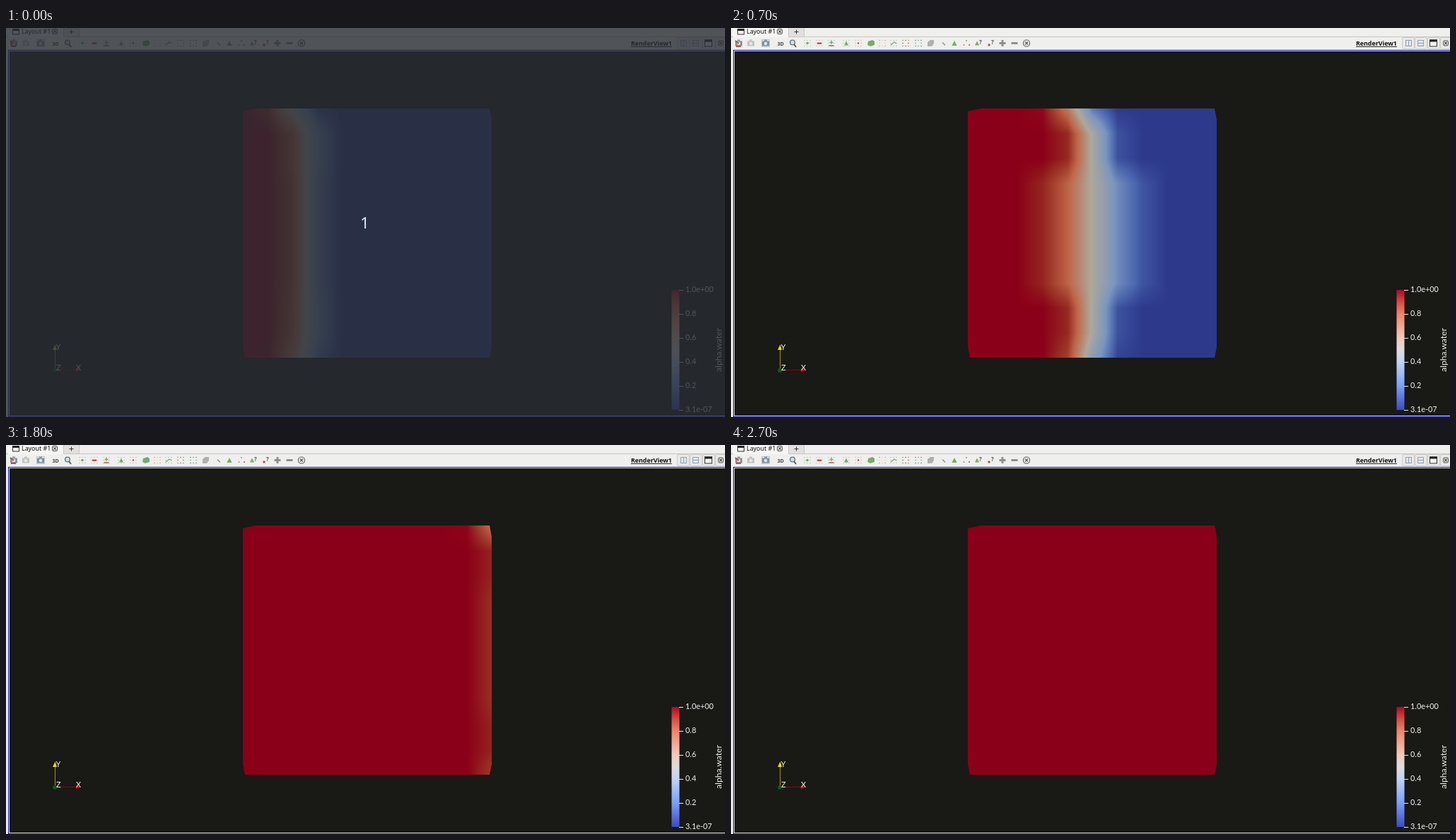
Animation, 1017 px wide and 551 px high, one loop 5.1 s. Source, as an HTML page with a canvas:

```html
<!DOCTYPE html>
<html lang="en">
<head>
<meta charset="utf-8">
<title>Render view</title>
<style>
  html, body { margin: 0; width: 100%; height: 100%; overflow: hidden; background: #191916; }
  svg, #veil { position: absolute; left: 0; top: 0; width: 1017px; height: 551px; display: block; }
  #field {
    position: absolute; left: 335px; top: 114px;
    clip-path: polygon(0 4px, 18px 0, 349px 0, 352px 16px, 352px 338px, 349px 353px, 3px 353px, 0 338px);
  }
  .ui { font: 8.85px "Noto Sans", "Open Sans", sans-serif; fill: #111; }
  .bold { font-weight: 700; }
  .label { font: 10.9px Lato, sans-serif; fill: #f2f2f2; }
  #veil {
    background: rgba(40, 44, 52, .8); color: #d3effb;
    font: 22px/551px "Noto Sans", "Open Sans", sans-serif; text-align: center;
  }
  #veil span { position: relative; left: -1px; }
</style>
</head>
<body>
<svg id="ui" viewBox="0 0 1017 551">
  <defs>
    <linearGradient id="scale" x1="0" y1="0" x2="0" y2="1">
      <stop offset="0" stop-color="#b40426"/>
      <stop offset=".1" stop-color="#d44e41"/>
      <stop offset=".2" stop-color="#ee8468"/>
      <stop offset=".4" stop-color="#f2cbb7"/>
      <stop offset=".5" stop-color="#dddddd"/>
      <stop offset=".6" stop-color="#c0d4f5"/>
      <stop offset=".8" stop-color="#7b9ff9"/>
      <stop offset="1" stop-color="#3b4cc0"/>
    </linearGradient>
  </defs>
  <rect width="1017" height="551" fill="#efefed"/>
  <rect x="3" width="78" height="13" fill="#f6f5f4"/>
  <rect x="82" width="21" height="12" fill="#e2e0de"/>
  <path d="M81.5 0V12M103.5 0V12M0 12.5H3M81 12.5H1017" stroke="#c8c5c2" fill="none"/>
  <text class="ui" x="22" y="8">Layout #1</text>
  <path d="M92.5 2.5V8.5M89.5 5.5H95.5" stroke="#333"/>
  <text class="ui bold" x="884" y="25" text-decoration="underline">RenderView1</text>
  <text class="ui bold" x="65.5" y="25" style="font-size:7.2px;fill:#444">3D</text>

  <rect x="3.5" y="31.5" width="1020" height="519" fill="#191916" stroke="#1616c0"/>
  <rect x="4.5" y="32.5" width="1020" height="517" fill="none" stroke="#d8d8ee"/>

  <path d="M69 484.500H101" stroke="#a00000"/>
  <path d="M99 481.500L106 484.500L99 487.500Z" fill="#c80000"/>
  <path d="M69.500 485V455" stroke="#a0a000"/>
  <path d="M66 456L69.500 448.500L72 456Z" fill="#dede00"/>
  <circle cx="69" cy="485" r="3" fill="#075c0b"/>
  <text class="label" x="70.5" y="456">Y</text>
  <text class="label" x="71" y="485">Z</text>
  <text class="label" x="99" y="485">X</text>

  <rect x="941.5" y="371" width="11" height="170" fill="url(#scale)"/>
  <text class="label" transform="translate(1012 487) rotate(-90)" style="font-size:12.2px">alpha.water</text>
</svg>
<canvas id="field" width="352" height="353"></canvas>
<div id="veil"><span>1</span></div>
<script>
const ui = document.getElementById('ui');
const veil = document.getElementById('veil');
const ctx = document.getElementById('field').getContext('2d');

function add(tag, attrs, text) {
  const el = document.createElementNS('http://www.w3.org/2000/svg', tag);
  for (const key in attrs) el.setAttribute(key, attrs[key]);
  if (text) el.textContent = text;
  ui.append(el);
}
const line = (d, stroke, w = 1) => add('path', { d, stroke, fill: 'none', 'stroke-width': w });
const shape = (d, fill) => add('path', { d, fill });
const dot = (cx, cy, r, fill) => add('circle', { cx, cy, r, fill });
const ring = (cx, cy, r, stroke, fill = 'none') =>
  add('circle', { cx, cy, r, fill, stroke, 'stroke-width': 1.4 });
const box = (x, y, width, height, fill, stroke = 'none') =>
  add('rect', { x, y, width, height, fill, stroke });

// Colour legend
['1.0e+00', '0.8', '0.6', '0.4', '0.2', '3.1e-07'].forEach((name, i) => {
  const y = 371.5 + i * 34;
  line(`M952 ${y}h6`, '#eee');
  add('text', { x: 961, y: y + 2.8, class: 'label' }, name);
});

// Toolbar icons, each centred on (x, Y)
const Y = 21.5, GREEN = '#74ad66', RED = '#c04a48', GREY = '#8f8f8d', PALE = '#c2c2c0';
const tri = (x, r, fill) => shape(`M${x} ${Y - r}l${r} ${2 * r}h${-2 * r}Z`, fill);
const plus = (x, y, r, color, w) => line(`M${x} ${y - r}v${2 * r}M${x - r} ${y}h${2 * r}`, color, w);
const cross = (x, y, r) => line(`M${x - r} ${y - r}l${2 * r} ${2 * r}m0 ${-2 * r}l${-2 * r} ${2 * r}`, '#555', 1.1);

function grid(x, colors) {
  for (let i = 0; i < 9; i++)
    if (i !== 4) dot(x - 4 + i % 3 * 4, Y - 4 + Math.floor(i / 3) * 4, .8, colors[i % colors.length]);
}
function camera(x, fill) {
  box(x - 5, Y - 3, 10, 7, fill);
  box(x - 2, Y - 5, 4, 2, fill);
  dot(x, Y + .5, 2.3, '#e2e7e9');
}
function question(x) {
  add('text', { x, y: 23, class: 'ui bold', style: 'font-size:8px;fill:#555' }, '?');
}

camera(11, '#89939b');
line('M6 18l5 4m-4 4h7', RED, 1.8);
camera(28, '#c2c2c0');
box(43.5, 16.5, 11, 10, '#e4e7e8', '#c2c8cb');
camera(49, '#7c929d');
ring(87, 20.5, 3.4, '#66757e', '#d4dfe4');
line('M89 23l3 4', '#665c48', 2);

for (const x of [108, 125, 142, 163, 180, 230]) grid(x, [PALE]);
dot(108, Y, 1.8, GREEN);
box(122, Y - 1, 6, 2.4, RED);
plus(142, 20.5, 2.5, GREEN, 1.4);
line('M138.500 25h7', RED, 1.4);
tri(163, 3, GREEN);
dot(180, Y, 1.2, RED);
shape('M194 19l6 -2 3 2v5l-6 2 -4 -2Z', GREEN);
grid(214, ['#dd9a70', '#e4c9b5']);
line('M226 24l5 -4 3 2', GREEN, 1.3);
grid(247, ['#b48b37', '#686b70']);
grid(265, ['#5b83a6', GREEN]);
shape('M278 20l4 -3h5v5l-3 4h-6Z', '#b0b0ae');
line('M299 20.500l4 4', GREY, 1.5);
tri(316, 3.6, GREEN);
dot(333, 18, 1, GREEN);
dot(329.5, 24, 1, GREY);
dot(337, 24, 1, RED);
tri(348, 3, GREEN);
dot(365, 24, 1.7, RED);
question(351);
question(368);
plus(384, Y, 4.5, GREY, 3);
line(`M396.500 ${Y}h9`, GREY, 3);
ring(418, Y, 4.6, '#777');
cross(418, Y, 2);

// Window buttons
function windowIcon(x, y, w, h) {
  box(x, y, w, h, '#f4f4f2', '#333');
  box(x - .5, y - .5, w + 1, 3, '#222');
}
function closeIcon(x, y) {
  add('rect', { x: x - 3.5, y: y - 3.5, width: 7, height: 7, rx: 1.5, fill: 'none', stroke: '#555' });
  cross(x, y, 2);
}
function splitIcon(x, divider) {
  box(x - 4, 17.5, 8, 8, '#e2e8ed', '#8ea1b0');
  line(divider, '#8ea1b0');
}
windowIcon(9.5, 1.5, 9, 7.5);
closeIcon(69, 5);
for (let x = 949.5; x < 1017; x += 18)
  add('rect', { x, y: 13.5, width: 17, height: 16, rx: 1.5, fill: '#e9e9e7', stroke: '#cfcdca' });
splitIcon(958.5, 'M958.500 17v9');
splitIcon(975.5, 'M971 21.500h9');
windowIcon(988.5, 17, 10, 9);
closeIcon(1011, 21.5);

// Lit colour ramp: [value, r, g, b]
const RAMP = [
  [0, 45, 58, 140], [.1, 74, 100, 173], [.25, 123, 150, 192], [.5, 174, 168, 155],
  [.75, 190, 102, 72], [.92, 150, 40, 33], [1, 139, 0, 24]
];
function ramp(v) {
  const k = Math.max(1, RAMP.findIndex(stop => stop[0] >= v));
  const a = RAMP[k - 1], b = RAMP[k], mix = (v - a[0]) / (b[0] - a[0]);
  return [1, 2, 3].map(c => a[c] + (b[c] - a[c]) * mix);
}

// Water fraction on the nodes of a square mesh. The front lags along the
// top and bottom walls and is more diffuse in the middle rows.
const CELLS = 10, SIZE = 352, HEIGHT = 353, NARROW = 16;
const clamp = v => Math.min(1, Math.max(0, v));

function water(i, j, [, front, behind, ahead]) {
  const lag = j === 0 ? 22 : j === CELLS ? 8 : 0;
  const gap = front - lag - (335 + i * SIZE / CELLS);
  const middle = Math.abs(j - CELLS / 2) <= 2;
  const spread = middle ? (gap > 0 ? behind : ahead) : NARROW;
  return clamp(1.08 / (1 + Math.exp(-gap / spread)) - .04);
}

function paint(step) {
  const image = ctx.createImageData(SIZE, HEIGHT);
  const nodes = Array.from({ length: CELLS + 1 }, (_, j) =>
    Array.from({ length: CELLS + 1 }, (_, i) => water(i, j, step)));
  for (let y = 0, p = 0; y < HEIGHT; y++) {
    const v = y / HEIGHT * CELLS, j = Math.floor(v), fy = v - j;
    const row = nodes[j].map((n, i) => n + (nodes[j + 1][i] - n) * fy);
    for (let x = 0; x < SIZE; x++, p += 4) {
      const u = x / SIZE * CELLS, i = Math.floor(u);
      image.data.set([...ramp(row[i] + (row[i + 1] - row[i]) * (u - i)), 255], p);
    }
  }
  ctx.putImageData(image, 0, 0);
}

// [start ms, front x, spread behind the front, spread ahead of it]
const LOOP = 5100;
const steps = [
  [0, 424, 14, 14],
  [700, 509, 32, 32],
  [1100, 598, 42, 17],
  [1500, 682, 34, 17],
  [1800, 722, 18, 17],
  [2200, 762, 16, 16],
  [2700, 950, 16, 16]
];
let shown = -1;
function tick() {
  const t = performance.now() % LOOP;
  const now = steps.filter(step => step[0] <= t).length - 1;
  if (now !== shown) paint(steps[shown = now]);
  veil.style.visibility = t < 100 ? 'visible' : 'hidden';
  requestAnimationFrame(tick);
}
tick();
</script>
</body>
</html>
```
